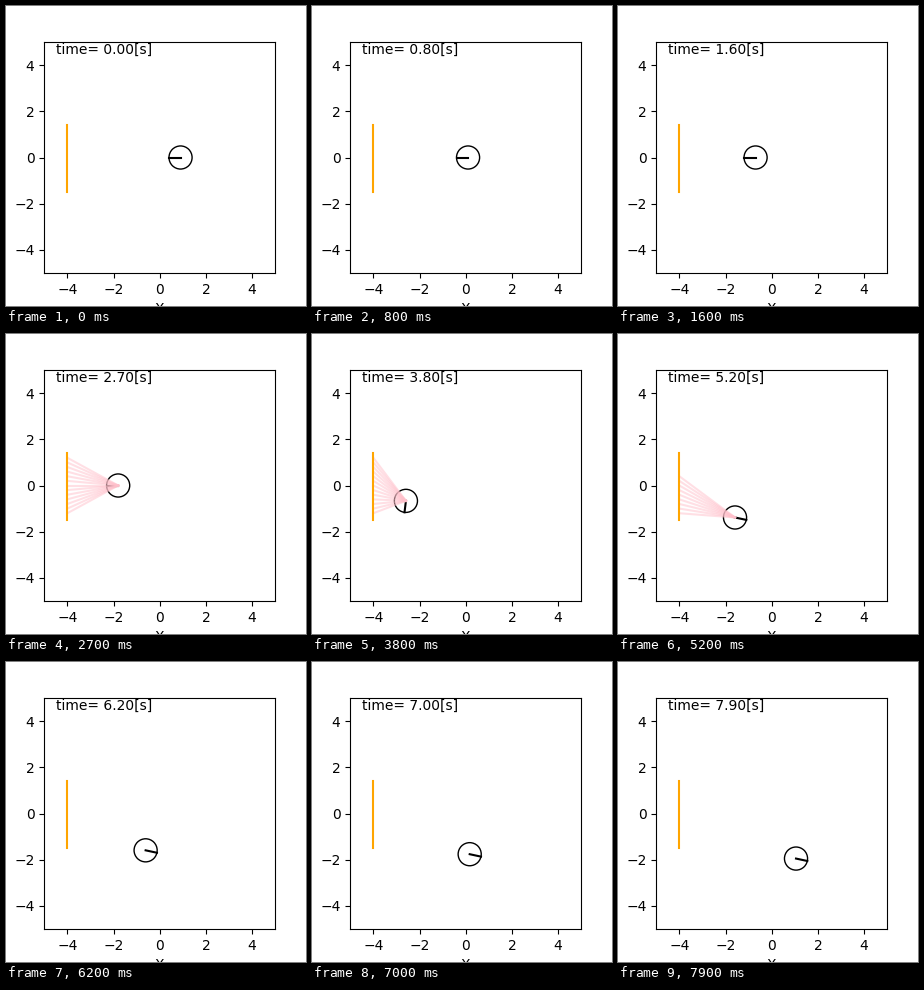
A matplotlib script for the animation above (8000 ms loop, 300 by 300 pixels).

```python
import numpy as np
import matplotlib.pyplot as plt
from matplotlib.animation import FuncAnimation

DT = 0.1
FRAMES = 80
RADIUS = 0.5
WALL_X = -4
SENSOR_RANGE = 3.0
EXIT = np.radians(-12.1)

wall_y = np.arange(-1.5, 1.45, 0.1)
targets = [(WALL_X, y) for y in np.linspace(-1.2, 1.2, 13)]

# (time, position, heading) along the U-turn; straight runs on either side
TURN = [
    (2.7, (-1.8, 0.0), np.pi),
    (3.8, (-2.59, -0.665), np.radians(263)),
    (4.5, (-2.274, -1.238), EXIT),
]


def unit(angle):
    return np.array([np.cos(angle), np.sin(angle)])


def hermite(t, start, end):
    t0, p0, a0 = start
    t1, p1, a1 = end
    span = t1 - t0
    s = (t - t0) / span
    p0, p1 = np.array(p0), np.array(p1)
    v0, v1 = unit(a0) * span, unit(a1) * span
    pos = ((2*s**3 - 3*s**2 + 1) * p0 + (s**3 - 2*s**2 + s) * v0
           + (3*s**2 - 2*s**3) * p1 + (s**3 - s**2) * v1)
    vel = (6*s**2 - 6*s) * (p0 - p1) + (3*s**2 - 4*s + 1) * v0 + (3*s**2 - 2*s) * v1
    return pos, np.arctan2(vel[1], vel[0])


def pose(t):
    first, middle, last = TURN
    if t <= first[0] or t >= last[0]:
        t0, p0, angle = first if t <= first[0] else last
        return np.array(p0) + unit(angle) * (t - t0), angle
    if t < middle[0]:
        return hermite(t, first, middle)
    return hermite(t, middle, last)


fig = plt.figure(figsize=(3, 3), dpi=100)
ax = fig.add_subplot(111)
ax.set_aspect("equal")
ax.set_xlim(-5, 5)
ax.set_ylim(-5, 5)
ax.set_xlabel("X")

ax.plot(np.full(len(wall_y), WALL_X), wall_y, color="orange", zorder=4)
body = ax.add_patch(plt.Circle((0, 0), RADIUS, fill=False, color="black"))
nose, = ax.plot([], [], color="black")
rays = [ax.plot([], [], color="pink", alpha=0.5, zorder=3)[0] for _ in targets]
clock = ax.text(-4.5, 4.5, "", fontsize=10)


def update(i):
    t = i * DT
    pos, angle = pose(t)
    tip = pos + RADIUS * unit(angle)
    body.center = tuple(pos)
    nose.set_data([pos[0], tip[0]], [pos[1], tip[1]])
    for ray, (x, y) in zip(rays, targets):
        ray.set_data([pos[0], x], [pos[1], y])
        ray.set_visible(np.hypot(x - pos[0], y - pos[1]) <= SENSOR_RANGE + 1e-6)
    clock.set_text(f"time= {t:.2f}[s]")
    return [body, nose, clock, *rays]


anim = FuncAnimation(fig, update, frames=FRAMES, interval=100,
                     repeat=True, repeat_delay=0)
plt.show()
```
